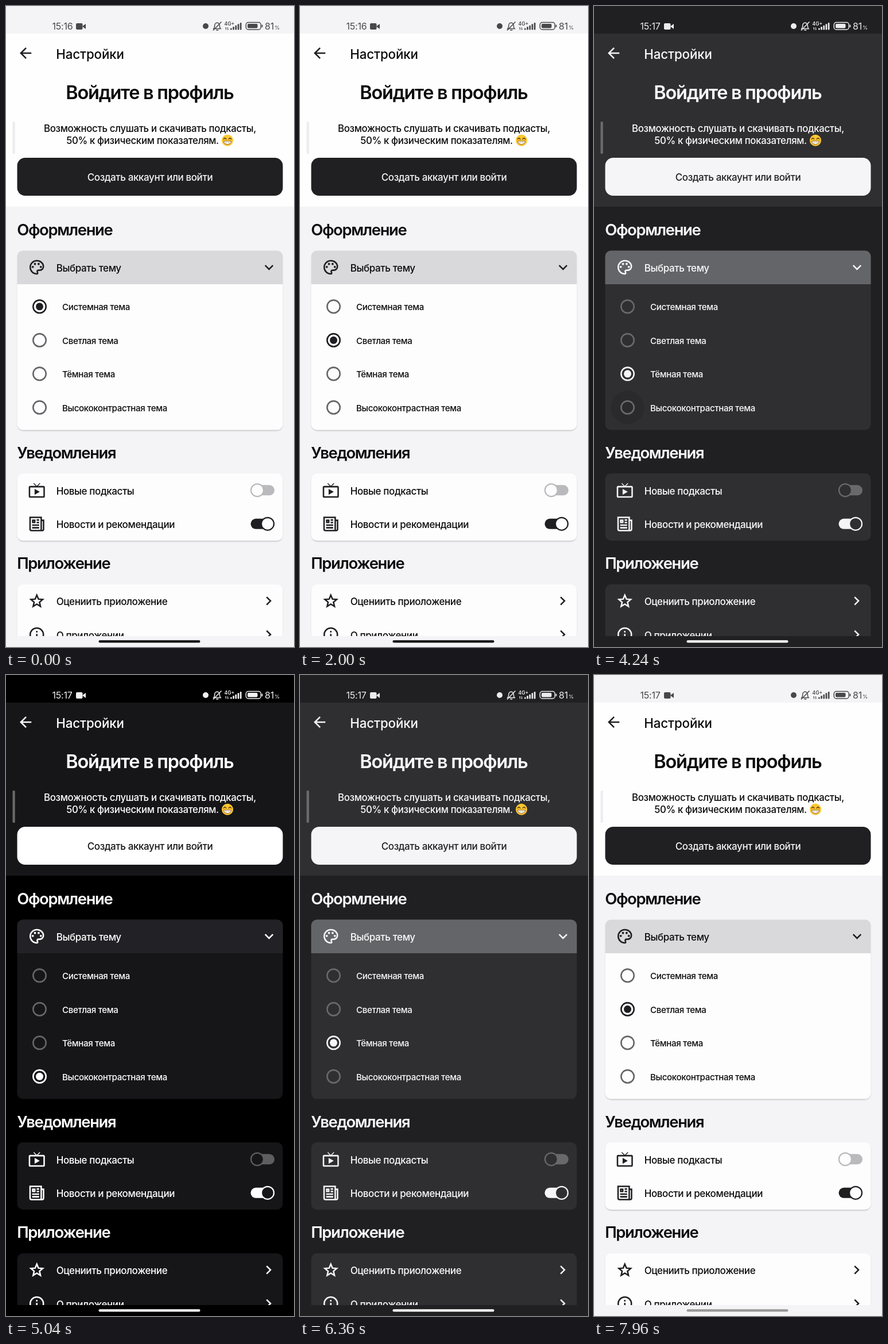
Animation, 502 px wide and 1115 px high, one loop 8 s. Source, as an HTML page:

```html
<!DOCTYPE html>
<html lang="ru">
<head>
<meta charset="utf-8">
<title>Настройки</title>
<style>
html, body { margin: 0; width: 100%; height: 100%; overflow: hidden; }
body {
  --page: #f4f3f6; --head: #fefefe; --card: #fdfdfe; --pick: #d9d8db;
  --ink: #1f1e21; --text: #0b0b0c; --button: #201f22; --label: #f5f4f7;
  --ring: #666669; --track: #bab9bc; --bar: #ececef; --status: #48484b; --shade: .2;
  background: var(--page);
}
body.dark {
  --page: #201f22; --head: #2f2f31; --card: #2f2e31; --pick: #646569;
  --ink: #f5f4f7; --text: #fafafb; --button: #f5f4f7; --label: #201f22;
  --ring: #69696c; --track: #69696c; --bar: #6c6c6f; --status: #ececee; --shade: 0;
}
body.contrast {
  --page: #000; --head: #161518; --card: #161518; --pick: #222125;
  --ink: #fff; --text: #fff; --button: #fff; --label: #161518;
  --ring: #666669; --track: #5e5e61; --bar: #69696c; --status: #f2f2f3; --shade: 0;
}
svg { display: block; width: 502px; height: 1115px; }
text {
  font-family: Inter, "Open Sans", sans-serif; font-optical-sizing: none;
  font-weight: 500; fill: var(--text); white-space: pre;
}
.mid { text-anchor: middle; }
.bar { font-size: 22.3px; font-weight: 450; letter-spacing: -.1px; }
.title { font-size: 32.5px; font-weight: 600; letter-spacing: -1.25px; }
.section { font-size: 27.4px; font-weight: 600; letter-spacing: -1.3px; }
.row { font-size: 17px; letter-spacing: -.4px; }
.option { font-size: 15.1px; letter-spacing: -.35px; }
.note { font-size: 16.8px; letter-spacing: -.32px; }
.label { fill: var(--label); }
.line { fill: none; stroke: var(--ink); stroke-width: 2; }
.solid { fill: var(--ink); }
.card { fill: var(--card); }
.shade { fill: #000; opacity: var(--shade); filter: blur(1.2px); }
.ring { fill: none; stroke: var(--ring); stroke-width: 2.6; }
.dot { fill: var(--ink); visibility: hidden; }
.on .ring { stroke: var(--ink); }
.on .dot { visibility: visible; }
#status text, #status .fill { fill: var(--status); }
#status text { font-weight: 400; }
#status .stroke { fill: none; stroke: var(--status); stroke-width: 1.5; }
</style>
</head>
<body>
<svg viewBox="0 0 502 1115" id="stage"></svg>
<script>
const LOOP = 8000;
const themes = [
  { at: 0, option: 0, look: '' },
  { at: 1240, option: 1, look: '' },
  { at: 2680, option: 2, look: 'dark', press: 40 },
  { at: 4280, option: 3, look: 'contrast', press: 140 },
  { at: 6160, option: 2, look: 'dark', press: 120 },
  { at: 7560, option: 1, look: '', press: 120 }
];
const CLOCK_AT = 3400;
const optionNames = ['Системная тема', 'Светлая тема', 'Тёмная тема', 'Высококонтрастная тема'];
const optionY = i => 522.8 + i * 58.5;

const icons = {
  back: '<path class="line" d="M20 12H5.6M12.8 4.8 5.6 12l7.2 7.2"/>',
  palette: '<path class="line" d="M12 21a9 9 0 1 1 0-18c5 0 9 3.6 9 8a5 5 0 0 1-5 5h-1.8c-1.5 0-2.2 1.6-1.3 2.9.7 1 .1 2.1-.9 2.1z"/>' +
    [[6.5, 11.5], [9.5, 7.5], [14.5, 7.5], [17.5, 11.5]].map(([x, y]) => `<circle class="solid" cx="${x}" cy="${y}" r="1.5"/>`).join(''),
  tv: '<rect class="line" x="2" y="7" width="20" height="14" rx="1"/><path class="line" style="stroke-width:1" d="m7.7 2.4 4.3 4.3 4.3-4.3"/><path class="solid" d="M9 10v8l7-4z"/>',
  news: '<path class="line" d="M2.8 3h15.2v18H4.8a2 2 0 0 1-2-2zM18 7h3.2v12a2 2 0 0 1-2 2h-2M5.6 13.6h9.6M5.6 17.2h9.6M11.8 6.6h3.4M11.8 10h3.4"/><path class="line" d="M6.4 7h2.8v2.8H6.4z"/>',
  star: '<path class="line" d="m12 4.05 2.26 5.33 5.77.49-4.38 3.8 1.31 5.64L12 16.32l-4.96 2.99 1.31-5.64-4.38-3.8 5.77-.49z"/>',
  info: '<circle class="line" cx="12" cy="12" r="9"/><path class="line" d="M12 11v6M12 7v2"/>',
  down: '<path class="line" d="M6.7 9.3 12 14.6l5.3-5.3"/>',
  right: '<path class="line" d="M9.3 6.7 14.6 12l-5.3 5.3"/>'
};

const icon = (name, x, y) =>
  `<g transform="translate(${x} ${y}) scale(1.277) translate(-12 -12)">${icons[name]}</g>`;
const text = (kind, x, y, words) => `<text class="${kind}" x="${x}" y="${y}">${words}</text>`;
const rect = (x, y, w, h, r, extra) =>
  `<rect x="${x}" y="${y}" width="${w}" height="${h}" rx="${r}" ${extra}/>`;
const paint = name => `style="fill:var(--${name})"`;
const card = (y, h) =>
  rect(20, y + 1.5, 462, h, 10, 'class="shade"') + rect(19.5, y, 463, h, 10, 'class="card"');
const section = (y, words) => text('section', 19.2, y, words);
const row = (name, y, words) => icon(name, 53.7, y) + text('row', 87.7, y + 7.2, words);

function toggle(y, on) {
  const color = on ? 'ink' : 'track';
  return rect(426.5, y - 9, 41.5, 18, 9, paint(color)) +
    `<circle cx="${on ? 456 : 438}" cy="${y}" r="11" stroke-width="2.2" style="fill:var(--card);stroke:var(--${color})"/>`;
}

const option = (words, i) => `<g class="option-row">
  <circle class="ring" cx="58.5" cy="${optionY(i)}" r="11.2"/>
  <circle class="dot" cx="58.5" cy="${optionY(i)}" r="6.5"/>
  ${text('option', 98, optionY(i) + 6.3, words)}</g>`;

const signal = [0, 1, 2, 3, 4].map(i =>
  rect(391 + i * 4.2, 38.5 - i * 2.4, 2.7, 3 + i * 2.4, 1, 'class="fill"')).join('');

const status = `<g id="status">
  <text id="clock" x="80.5" y="41" font-size="16" letter-spacing="-.2"></text>
  ${rect(122, 30, 11.5, 11, 2, 'class="fill"')}
  <path class="fill" d="m133 35.5 6-4.5v9z"/>
  <circle class="fill" cx="348" cy="35" r="5"/>
  <path class="stroke" d="M362.5 39.5h11.5c-1.8-2-1.8-4-1.8-6a4.2 4.2 0 0 0-8.4 0c0 2 0 4-1.8 6zM366.3 42h4M361 42.5l14.5-15"/>
  <text x="380.5" y="33.5" font-size="8.5" style="font-weight:600">4G+</text>
  <path class="stroke" style="stroke-width:1" d="M383.5 37v4.5m3-4.5v4.5m-4-3 1-1.5m4 3-1 1.5"/>
  ${signal}
  ${rect(418.3, 28.5, 26, 12.4, 4, 'class="stroke"')}
  ${rect(421, 31, 17.5, 7.4, 1.8, 'class="fill"')}
  ${rect(445.6, 32.5, 1.8, 4.6, .9, 'class="fill"')}
  <text x="451" y="41" font-size="16" letter-spacing="-.2">81</text>
  <text x="468" y="41" font-size="9.5">%</text>
</g>`;

const grin = `<g transform="translate(386 233.8)">
  <circle r="10" fill="#fcc62f"/>
  <path d="M-6.6-2.2q2-3.8 4.4 0M2.2-2.2q2.4-3.8 4.4 0" fill="none" stroke="#5d3b12" stroke-width="1.5" stroke-linecap="round"/>
  <path d="M-6.6 1.2H6.6Q5.6 7 0 7t-6.6-5.8z" fill="#fff" stroke="#8a5a1c" stroke-width=".9"/>
  <path d="M-5.6 3.8H5.6M-2.4 1.4v5M2.4 1.4v5" stroke="#b9a58a" stroke-width=".5"/>
</g>`;

document.getElementById('stage').innerHTML = `
  <clipPath id="view"><rect width="502" height="1096"/></clipPath>
  ${rect(0, 0, 502, 1115, 0, paint('page'))}
  ${rect(0, 48, 502, 301, 0, paint('head'))}
  ${status}
  ${icon('back', 34, 82)}
  ${text('bar', 87.2, 91.5, 'Настройки')}
  ${text('title mid', 250.5, 162.2, 'Войдите в профиль')}
  ${rect(11.5, 201, 4.2, 56, 1.5, paint('bar'))}
  ${text('note mid', 251, 218.7, 'Возможность слушать и скачивать подкасты,')}
  ${text('note mid', 238, 240, '50% к физическим показателям.')}
  ${grin}
  ${rect(19.5, 264, 463, 66, 14, paint('button'))}
  ${text('row mid label', 251, 304.2, 'Создать аккаунт или войти')}
  ${section(398.5, 'Оформление')}
  ${card(425.5, 312)}
  <path ${paint('pick')} d="M19.5 484v-48.5a10 10 0 0 1 10-10h443a10 10 0 0 1 10 10V484z"/>
  ${row('palette', 454.5, 'Выбрать тему')}
  ${icon('down', 458.5, 454.5)}
  <circle id="ripple" cx="58.5" opacity=".11"/>
  ${optionNames.map(option).join('')}
  ${section(786.5, 'Уведомления')}
  ${card(813, 117)}
  ${row('tv', 842.5, 'Новые подкасты')}
  ${toggle(842.3, false)}
  ${row('news', 901, 'Новости и рекомендации')}
  ${toggle(900.8, true)}
  ${section(979.3, 'Приложение')}
  <g clip-path="url(#view)">
    ${card(1006, 130)}
    ${row('star', 1035, 'Оцениить приоложение')}
    ${icon('right', 457.7, 1034.8)}
    ${row('info', 1093.5, 'О приложении')}
    ${icon('right', 457.7, 1093.3)}
  </g>
  ${rect(161.5, 1103.3, 177, 4.2, 2.1, 'id="handle"')}`;

const clock = document.getElementById('clock');
const ripple = document.getElementById('ripple');
const handle = document.getElementById('handle');
const optionRows = [...document.querySelectorAll('.option-row')];
const ramp = (t, from, to) => Math.min(1, Math.max(0, (t - from) / (to - from)));

function draw(t) {
  const now = themes.filter(s => s.at <= t).pop();
  document.body.className = now.look;
  optionRows.forEach((el, i) => el.classList.toggle('on', i === now.option));
  clock.textContent = t < CLOCK_AT ? '15:16' : '15:17';

  const next = themes.find(s => s.press && t < s.at && t >= s.at - s.press);
  ripple.setAttribute('r', next ? 29 * Math.sqrt(ramp(t, next.at - next.press, next.at - 40)) : 0);
  if (next) ripple.setAttribute('cy', optionY(next.option));

  // The system handle follows the theme with a delay.
  const glow = ramp(t, 2960, 3160) - ramp(t, 7840, 8120);
  const v = Math.round(16 + 239 * glow);
  handle.setAttribute('fill', `rgb(${v},${v},${v})`);
}

const start = performance.now();
function tick() {
  draw((performance.now() - start) % LOOP);
  requestAnimationFrame(tick);
}
tick();
</script>
</body>
</html>
```
